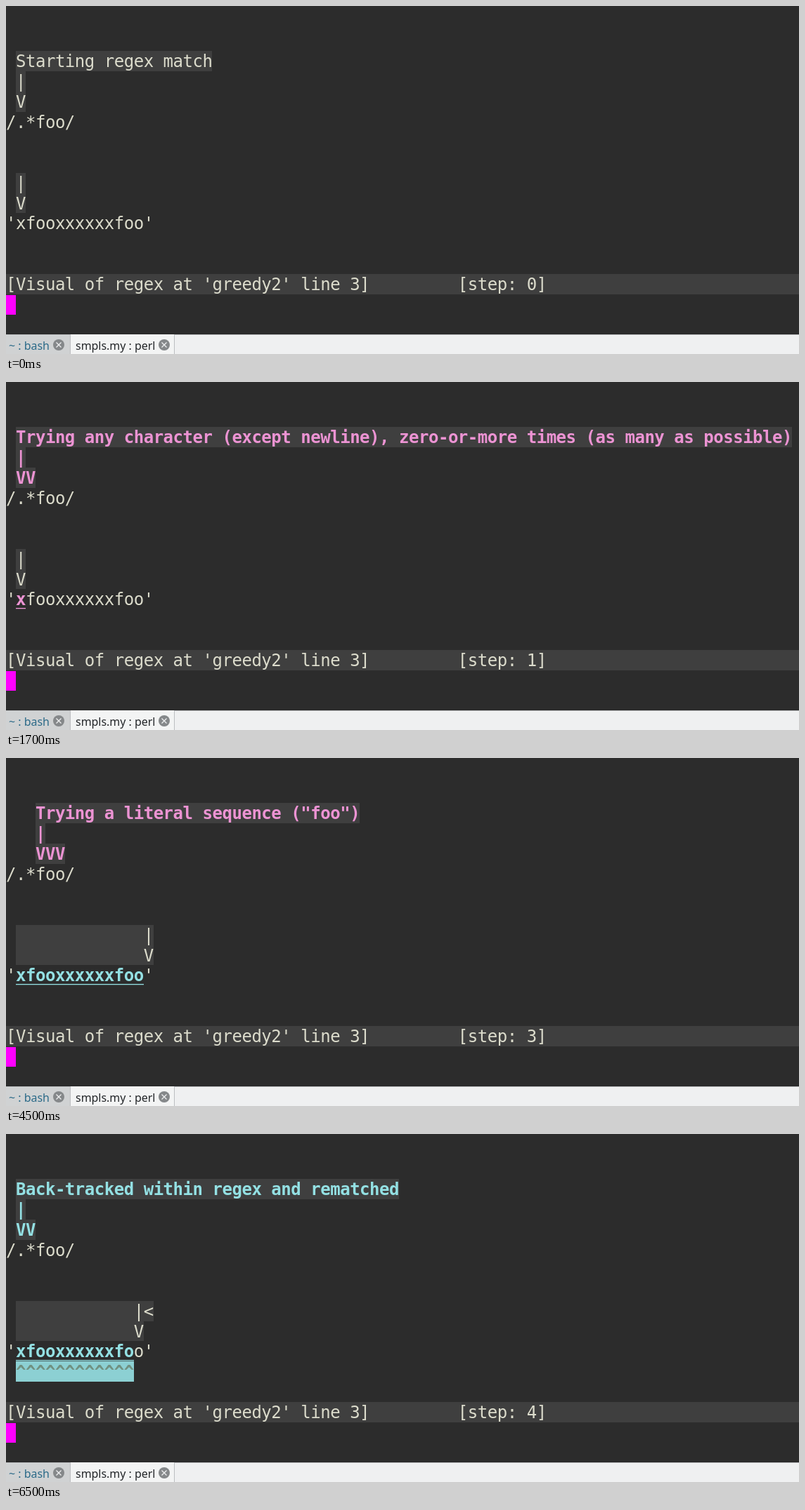
Write an HTML page that moves like this. It is 1128 px wide and 496 px high and loops after 8000 ms.

```html
<!DOCTYPE html>
<html lang="en">
<head>
<meta charset="utf-8">
<title>Regex stepping</title>
<style>
  html, body { margin: 0; width: 100%; height: 100%; overflow: hidden; background: #2c2c2c; }
  svg { display: block; }
  text { white-space: pre; }
  #screen text { font: 24px "DejaVu Sans Mono", monospace; }
  #screen text.bold { font-weight: bold; }
  #tabs text { font: 15.95px "Noto Sans", sans-serif; }
</style>
</head>
<body>
<svg width="1128" height="496" viewBox="0 0 1128 496">
  <g id="screen"></g>
  <g id="tabs">
    <rect y="468" width="1128" height="28" fill="#eff0f1"/>
    <rect y="468" width="91" height="28" fill="#d0d2d3"/>
    <path d="M0 468.5H1128M91.5 468V496M239.5 468V496" stroke="#bcbec0"/>
    <rect x="92" y="468" width="147" height="28" fill="#f3f4f4"/>
    <text x="4" y="490" fill="#2b6a88">~ : bash</text>
    <text x="99" y="490" fill="#232629">smpls.my : perl</text>
    <g id="close">
      <circle cx="75" cy="483" r="8" fill="#85888a"/>
      <path d="M71.5 479.5l7 7m0-7l-7 7" stroke="#eff0f1" stroke-width="1.3"/>
    </g>
    <use href="#close" x="150"/>
  </g>
</svg>
<script>
const LOOP = 8000, CELL = 13.975, ROW = 28.93, TOP = 64;
const PLAIN = '#dcdccc', SHADE = '#3f3f3f', PINK = '#ec93d3', CYAN = '#93e0e3', TEAL = '#8cd0d3';
const SUBJECT = 'xfooxxxxxxfoo';

// matched: highlighted characters; pos: subject pointer column
const steps = [
  { at: 0, label: 'Starting regex match', color: PLAIN, col: 1, span: 1, pos: 1, matched: 0 },
  { at: 500, label: 'Trying any character (except newline), zero-or-more times (as many as possible)',
    color: PINK, col: 1, span: 2, pos: 1, matched: 1 },
  { at: 2500, label: 'Matched', color: CYAN, col: 1, span: 2, pos: 14, matched: 13, carets: true },
  { at: 4500, label: 'Trying a literal sequence ("foo")', color: PINK, col: 3, span: 3, pos: 14,
    matched: 13, matchColor: CYAN },
  { at: 6500, label: 'Back-tracked within regex and rematched', color: CYAN, col: 1, span: 2, pos: 13,
    matched: 12, carets: true, back: '<' },
];

const screen = document.getElementById('screen');
const rowTop = row => Math.round(TOP + row * ROW);

function add(tag, attrs) {
  const node = document.createElementNS('http://www.w3.org/2000/svg', tag);
  for (const name in attrs) node.setAttribute(name, attrs[name]);
  return screen.appendChild(node);
}

function box(x, y, width, height, fill) {
  add('rect', { x, y, width, height, fill });
}

function shade(row, col, count, fill = SHADE) {
  const x = Math.round(col * CELL), y = rowTop(row);
  box(x, y, Math.round((col + count) * CELL) - x, rowTop(row + 1) - y, fill);
}

function write(row, col, string, fill = PLAIN, bold = false) {
  const x = [...string].map((_, i) => ((col + i) * CELL).toFixed(2)).join(' ');
  add('text', { x, y: rowTop(row) + 23, fill, class: bold ? 'bold' : '' }).textContent = string;
}

function draw(step, number) {
  const { label, color, col, span, pos, matched, carets, back = '', matchColor = color } = step;
  screen.replaceChildren();
  box(0, 0, 1128, 496, '#2c2c2c');

  [label, '|', 'V'.repeat(span)].forEach((line, row) => {
    shade(row, col, line.length);
    write(row, col, line, color, color !== PLAIN);
  });
  write(3, 0, '/.*foo/');

  ['|' + back, 'V'].forEach((line, i) => {
    shade(6 + i, 1, pos - 1 + line.length);
    write(6 + i, pos, line);
  });

  write(8, 0, "'");
  write(8, 1, SUBJECT.slice(0, matched), matchColor, true);
  write(8, 1 + matched, SUBJECT.slice(matched) + "'");
  if (matched) box(14, 322, Math.round((matched + 1) * CELL) - 14, 1.3, matchColor);
  if (carets) {
    shade(9, 1, matched, TEAL);
    write(9, 1, '^'.repeat(matched), '#709080', true);
  }

  box(0, 382, 1128, 29, SHADE);
  write(11, 0, "[Visual of regex at 'greedy2' line 3]");
  write(11, 46, `[step: ${number}]`);
  box(0, 412, 14, 28, '#ff00ff');
}

const start = performance.now();
let shown = -1;
function tick() {
  const time = (performance.now() - start) % LOOP;
  const current = steps.findLastIndex(step => step.at <= time);
  if (current !== shown) draw(steps[shown = current], current);
  requestAnimationFrame(tick);
}
tick();
</script>
</body>
</html>
```
